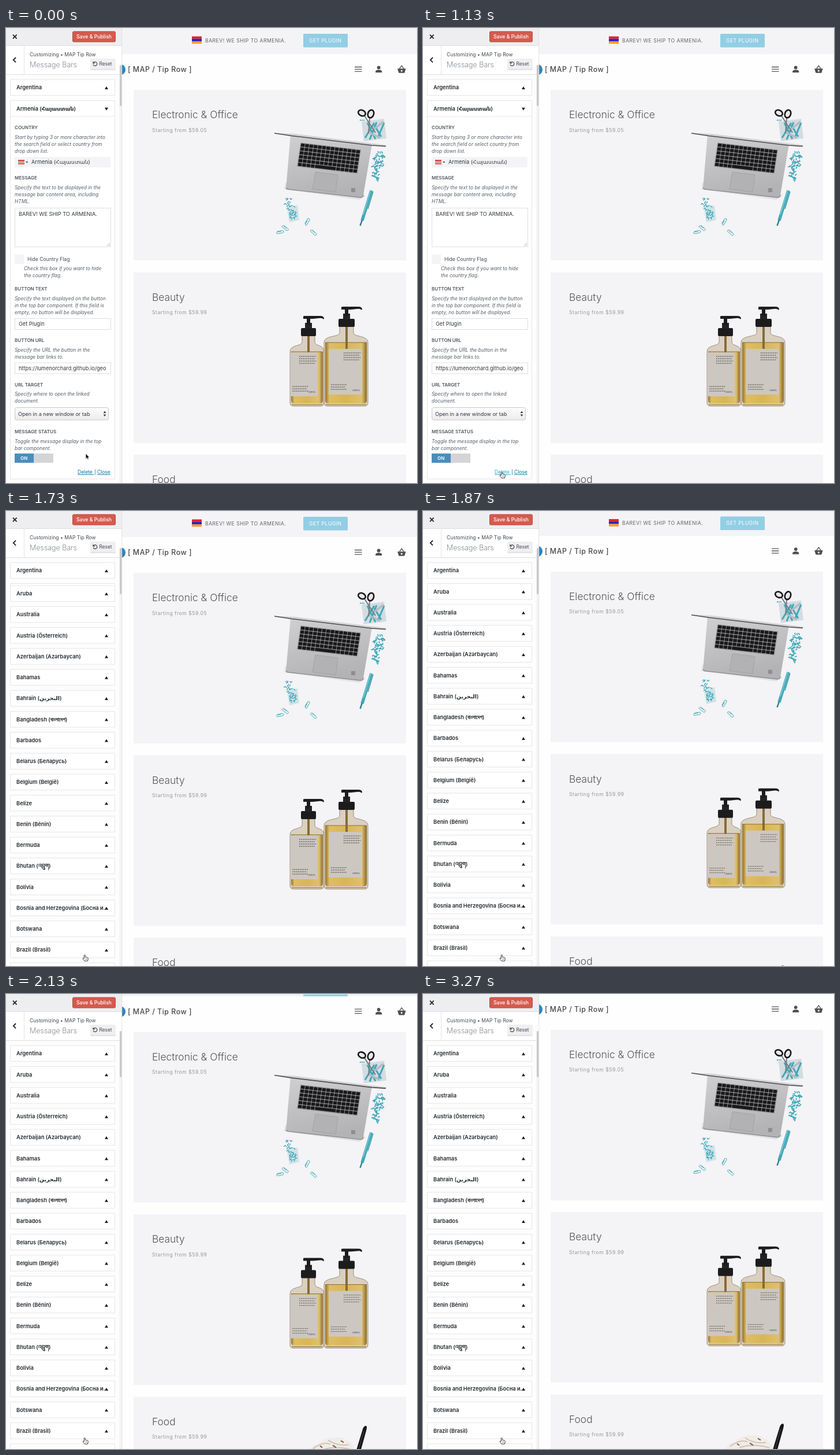
Animation of 712 by 787 pixels, one loop 3.34 s. Source, as an HTML page:

```html
<!DOCTYPE html>
<html lang="en">
<head>
<meta charset="utf-8">
<title>Message Bars</title>
<style>
html, body { margin: 0; width: 100%; height: 100%; overflow: hidden; background: #fff; }
svg { display: block; width: 712px; height: 787px; }
text { font-family: Inter, "Noto Sans", "DejaVu Sans", sans-serif; white-space: pre; }
.row { font-size: 9.3px; font-weight: 600; fill: #23282d; }
.cap { font-size: 8px; font-weight: 600; fill: #50575e; }
.hint { font-size: 8.4px; font-style: italic; fill: #555d66; }
.field { font-size: 9.2px; fill: #32373c; }
.label { font-size: 8.6px; fill: #444a50; }
.link { font-size: 8.5px; fill: #0073aa; text-decoration: underline; }
.title { font-size: 17.4px; font-weight: 300; fill: #55565a; }
.price { font-size: 8.6px; letter-spacing: .55px; fill: #98989d; }
.bar { font-size: 8.7px; letter-spacing: .45px; fill: #66666b; }
.brand { font-size: 12.4px; font-weight: 500; letter-spacing: .5px; fill: #47484c; }
.tiny { font: 4.4px "Liberation Serif", serif; fill: #444; }
</style>
</head>
<body>
<svg id="stage" viewBox="0 0 712 787" xmlns="http://www.w3.org/2000/svg"></svg>
<script>
const LOOP = 3340, STEP = 200 / 3;
const OPEN_H = 655, SHIFT = 663.3, BAR_H = 45.3, PITCH = 36.25;

let seed = 7;
const rnd = () => (seed = (seed * 16807) % 2147483647) / 2147483647;

const text = (x, y, s, cls, extra = '') =>
  `<text x="${x}" y="${y}" class="${cls}" ${extra}>${s.replace(/&/g, '&amp;')}</text>`;
const rect = (x, y, w, h, fill, extra = '') =>
  `<rect x="${x}" y="${y}" width="${w}" height="${h}" fill="${fill}" ${extra}/>`;
const path = (d, fill, extra = '') => `<path d="${d}" fill="${fill}" ${extra}/>`;
const line = (d, color, w = 1, extra = '') =>
  path(d, 'none', `stroke="${color}" stroke-width="${w}" ${extra}`);
const group = (id, body, extra = '') => `<g id="${id}" ${extra}>${body}</g>`;
const flag = (x, y, w, h, colors) =>
  colors.map((c, i) => rect(x, y + i * h / 3, w, h / 3 + .1, c)).join('');

/* ---------- sidebar ---------- */
const countries = ['Aruba', 'Australia', 'Austria (Österreich)', 'Azerbaijan (Azərbaycan)',
  'Bahamas', 'Bahrain (البحرين)', 'Bangladesh (বাংলাদেশ)', 'Barbados', 'Belarus (Беларусь)',
  'Belgium (België)', 'Belize', 'Benin (Bénin)', 'Bermuda', 'Bhutan (འབྲུག)', 'Bolivia',
  'Bosnia and Herzegovina (Босна и…', 'Botswana', 'Brazil (Brasil)', 'British Virgin Islands'];
const EDGE = 'stroke="#e6e6e9"';

const row = (name, top, open) => {
  const c = top + 13.8;
  const tri = open ? `M171 ${c - 1.6}h6l-3 5z` : `M171 ${c + 3}h6l-3 -5z`;
  return rect(7.5, top, 181, 27.4, '#fff', EDGE) + text(18, c + 3.3, name, 'row') + path(tri, '#191e23');
};
const hints = (x, y, lines) => lines.map((s, i) => text(x, y + i * 12, s, 'hint')).join('');
const input = (y, h) => rect(15.5, y + .5, 166, h, '#fff', 'stroke="#dfdfe2"');

function armenia() {
  const name = 'Armenia (Հայաստան)';
  return rect(7.5, 125.5, 181, 654.5, '#fff', EDGE) + row(name, 125.5, true) +
    text(15, 175, 'COUNTRY', 'cap') +
    hints(15, 192, ['Start by typing 3 or more character into', 'the search field or select country from', 'drop down list.']) +
    rect(15, 223, 166, 18, '#f4f4f6') + flag(21, 228, 11, 8, ['#d6453f', '#b6b0cc', '#dc7458']) +
    path('M34 231h4.4l-2.2 2.6z', '#444') + text(44, 235, name, 'field') +
    text(15, 262, 'MESSAGE', 'cap') +
    hints(15, 279, ['Specify the text to be displayed in the', 'message bar content area, including', 'HTML.']) +
    input(311, 67) + text(22, 325, 'BAREV! WE SHIP TO ARMENIA.', 'field') +
    line('M175 377l5 -5M178 377l2 -2', '#999', .8) +
    rect(15, 392, 16, 16, '#f4f4f6') + text(37, 403, 'Hide Country Flag', 'label') +
    hints(31, 418.5, ['Check this box if you want to hide', 'the country flag.']) +
    text(15, 454, 'BUTTON TEXT', 'cap') +
    hints(15, 471, ['Specify the text displayed on the button', 'in the top bar component. If this field is', 'empty, no button will be displayed.']) +
    input(502, 19) + text(22, 515, 'Get Plugin', 'field') +
    text(15, 543, 'BUTTON URL', 'cap') +
    hints(15, 560, ['Specify the URL the button in the', 'message bar links to.']) +
    input(578.5, 19) + text(22, 591.5, 'https://lumenorchard.github.io/geo', 'field') +
    text(15, 619.5, 'URL TARGET', 'cap') +
    hints(15, 636, ['Specify where to open the linked', 'document.']) +
    rect(15.5, 656.5, 162, 21.5, 'url(#sel)', 'rx="3" stroke="#c9c9cc"') +
    text(21, 670.5, 'Open in a new window or tab', 'field', 'style="font-size:9.05px"') +
    path('M168.6 666h4.8l-2.4 -3.4zM168.6 668.4h4.8l-2.4 3.4z', '#333') +
    text(15, 700.5, 'MESSAGE STATUS', 'cap') +
    hints(15, 717.5, ['Toggle the message display in the top', 'bar component.']) +
    rect(15, 736, 33, 16, '#4a8dbd') + rect(48, 736, 34, 16, '#d4d4d6') +
    text(25, 747.2, 'ON', 'cap', 'style="fill:#fff"') +
    text(124, 771, 'Delete ', 'link', 'id="del"') + text(153, 771, '|', 'link') + text(158, 771, 'Close', 'link');
}

function sidebar() {
  const rows = countries.map((n, i) => row(n, 125.5 + i * PITCH)).join('');
  return rect(0, 0, 201, 787, '#fdfdfd') + row('Argentina', 89.2) +
    group('panel', armenia(), 'clip-path="url(#open)"') + group('rows', rows) +
    rect(0, 0, 201, 30, '#eeeef0') + rect(0, 30, 201, 50, '#fff') +
    line('M0 30.5H201M0 80.5H201', '#dedee1') + line('M31.5 30V80', '#e4e4e7') +
    line('M12 11.7l6.6 6.6M18.6 11.7l-6.6 6.6', '#23282d', 1.9) +
    rect(115.5, 6, 74, 18, '#d55b4e', 'rx="2" stroke="#b9483d"') +
    text(122, 18.4, 'Save & Publish', '', 'font-size="8.7" font-weight="500" fill="#fff"') +
    line('M17 51l-4.2 4.2l4.2 4.2', '#191e23', 1.8) +
    text(41, 49, 'Customizing • MAP Tip Row', 'label') +
    text(41, 67.6, 'Message Bars', '', 'font-size="12.6" font-weight="200" fill="#555d66"') +
    rect(146, 53, 44, 19, '#efeff1', 'rx="2"') + rect(146, 71.5, 44, 1, '#cfcfd3') +
    line('M152 59.6a3.4 3.4 0 1 1 -.8 3.6', '#444', 1.2) + path('M150.4 57.4v4h4z', '#444') +
    text(161.5, 65.3, 'Reset', 'label', 'style="font-size:8.3px"') +
    rect(196.5, 64, 4.5, 723, '#f3f3f4') + rect(197, 64, 3.6, 71, '#c9c9cb', 'id="thumb" rx="1.8"') +
    line('M200.7 0V787', '#dcdce0', .8);
}

/* ---------- preview ---------- */
const TEAL = '#3fa9b9';
const clip = (x, y, a) =>
  line('M-5 -2H4a2 2 0 0 1 0 4H-5a1.5 1.5 0 0 1 0 -3H2', TEAL, .9, `transform="translate(${x} ${y}) rotate(${a})"`);
const scatter = (n, x, y, w, h) => {
  let out = '';
  for (let i = 0; i < n; i++) {
    const a = rnd() * 6.28, px = x + rnd() * w, py = y + rnd() * h;
    out += `M${px.toFixed(1)} ${py.toFixed(1)}l${(Math.cos(a) * 4).toFixed(1)} ${(Math.sin(a) * 4).toFixed(1)}`;
  }
  return out;
};

function keys() {
  let out = rect(-.1, -.1, 14.2, 6.2, '#8f8f92');
  for (let r = 0; r < 6; r++)
    for (let c = 0; c < 14; c++) {
      const space = r === 5 && c === 4;
      if (r === 5 && c > 4 && c < 9) continue;
      out += rect(c + .06, r + .09, space ? 4.88 : .88, .82, '#19191b', 'rx=".12"');
    }
  return `<g transform="matrix(7.36 .86 -1 6.67 511 199)">${out}</g>`;
}

function office() {
  return path('M482 279L612 297L622 291L620 286L484 268z', '#d9d9dd', 'opacity=".7"') +
    path('M493 184L634 201L619 289Q618 293.5 613 293L489 279Q485 278 485.3 274z', 'url(#deck)') +
    line('M485.3 276Q486 279 489 279L613 293Q618 293.5 619 289', '#8d8d91', 1.4) +
    path('M465 181.5L500 183L659 202.6L657 206L634 203.5L493 187z', '#d2d2d5') +
    line('M465 182L495 186.5L634 203L658 204.5', '#4c4c50', 1.6) + keys() +
    path('M536 249L575 254L571 283.5L531 278.5z', '#b2b2b5', 'stroke="#9b9b9e" stroke-width=".7"') +
    rect(598, 277, 7, 7, '#8e8e92') +
    path('M616 162L655 157L659 191L620 196z', '#cbd7dc', 'opacity=".8"') +
    line('M622 190l16 -26M630 193l12 -30M640 192l-14 -28M650 188l-12 -20M644 190l11 -26', TEAL, 3) +
    line('M636 176l18 -14M628 180l20 10', '#b4bcc2', 3.5) +
    line('M613 159.5h8', TEAL, 2, 'stroke-dasharray="2 1"') +
    line('M621 152L640 181M630 156L628 182', '#777b80', 2) +
    `<g fill="#e9e9ec" stroke="#17181a" stroke-width="2.6"><ellipse cx="616.5" cy="147" rx="6.6" ry="4.8" transform="rotate(25 616.5 147)"/><ellipse cx="632" cy="148.5" rx="5" ry="7" transform="rotate(20 632 148.5)"/></g>` +
    line(scatter(48, 636, 216, 18, 26) + scatter(22, 635, 240, 10, 22), TEAL, 1.7) +
    line('M633 281L617 333', TEAL, 5.4) + line('M632 281L619 323', '#8fd2da', 1.2) +
    line('M617 332L613.5 342', '#2c7f8d', 2.4) + line('M636 283L627 313', '#2c8c9b', 1.2) +
    path('M486 309L505 307L508 332L491 336z', '#c5dfe5', 'opacity=".8"') +
    line(scatter(30, 488, 306, 14, 22) + scatter(12, 484, 294, 12, 13), TEAL, 1.3) +
    clip(475, 353, -10) + clip(484, 346, 38) + clip(522, 335, -60) + clip(533, 354, 42);
}

function bottle(x, w, y, c, n, lx, lw, ly, lh) {
  const r = x + w, neck = y - 13, top = neck - 34;
  const body = `M${c - n} ${neck}V${y - 2}C${c - n} ${y + 6} ${x} ${y + 2} ${x} ${y + 15}V648q0 6 6 6H${r - 6}q6 0 6 -6V${y + 15}C${r} ${y + 2} ${c + n} ${y + 6} ${c + n} ${y - 2}V${neck}z`;
  const dots = (dx, dy, len, rows) => {
    let d = '';
    for (let i = 0; i < rows; i++) d += `M${dx} ${dy + i * 4}h${len - i % 2 * 2}`;
    return line(d, '#5c5752', 1.3, 'stroke-dasharray="1.6 1.5"');
  };
  return path(body, '#d9d0c2', 'stroke="#8b7a5a" stroke-width=".8"') +
    path(`M${x + 2} ${y + 15}H${r - 2}V644q0 5 -5 5H${x + 7}q-5 0 -5 -5z`, 'url(#oil)') +
    line(`M${x + 2} ${y + 15}H${r - 2}`, '#8d6f2c', 1) +
    line(`M${x + 3} 651.5H${r - 3}`, '#ab8b4c', 1.6) +
    line(`M${c} ${neck}V${ly}`, '#8a6a35', 4) +
    rect(lx, ly, lw, lh, '#cdc7c1') +
    dots(lx + lw - 32, ly + 7, 29, 4) + dots(lx + 4, ly + lh - 17, 27, 3) +
    text(lx + lw - 17, ly + lh - 6, 'ORDIL', 'tiny') +
    rect(c - n - 2, neck - 13, 2 * n + 4, 14, '#1d1c1d', 'rx="2"') +
    rect(c - 6, neck - 22, 12, 10, '#242324') + rect(c - 3, top + 4, 6, 12, '#1d1c1d') +
    path(`M${c - 9} ${top + 1}q0 -1 2 -1H${c + 20}q7 0 7 5l-1.5 .4q-1 -2 -6 -1.6L${c + 8} ${top + 5}H${c - 9}z`, '#1d1c1d');
}

function beauty() {
  return bottle(492, 59, 545, 524, 11, 492.5, 47.5, 561, 76) +
    bottle(551, 76, 529, 590, 12, 559, 58, 555, 79);
}

function dessert() {
  return path('M524 840Q524 822 541 820Q552 808 568 809Q582 806 590 814Q604 816 606 840z', '#f1ece7') +
    line('M532 828Q548 815 562 820M558 813Q574 824 594 821M548 830Q570 822 600 830', '#cfc4ba', 2) +
    line('M566 822l6 4M580 814l5 3M544 823l4 3', '#8b5c3c', 2) +
    path('M604 840L618 794Q620 788 624 788.5Q626 790 624 797L612 840z', '#161617') +
    line('M620 797L610 832', '#4c4c4f', 1);
}

function card(y, name, price, art) {
  return rect(221, y, 472, 295, '#f4f3f6') + text(253, y + 49.2, name, 'title') +
    text(253, y + 72.6, 'Starting from ' + price, 'price') + art;
}

function page() {
  return `<circle cx="197.5" cy="72" r="10.8" fill="#fff"/><circle cx="197.5" cy="72" r="9.6" fill="#2f84bd"/>` +
    text(211, 76.4, '[ MAP / Tip Row ]', 'brand') +
    line('M604 67.5h12.5M604 71.3h12.5M604 75.1h12.5', '#55565a', 1.3) +
    `<circle cx="645.7" cy="68.4" r="2.9" fill="#4e4f53"/>` +
    path('M640.2 77v-1.6q0 -3 5.5 -3.2q5.5 .2 5.5 3.2V77z', '#4e4f53') +
    path('M678.2 70.2h14.4l-2 6.8q-.3 .8 -1.2 .8h-8q-.9 0 -1.2 -.8z', '#4e4f53') +
    line('M681.6 70.5l3.8 -5.3l3.8 5.3', '#4e4f53', 1.3) +
    `<circle cx="685.4" cy="74" r="1.5" fill="#fff"/>` +
    card(107, 'Electronic & Office', '$59.05', office()) +
    card(422.6, 'Beauty', '$59.99', beauty()) +
    card(738, 'Food', '$59.99', dessert());
}

const notice = () => flag(322, 14.5, 17, 12.6, ['#e0262b', '#2a22c9', '#f2a02c']) +
  text(345, 24.7, 'BAREV! WE SHIP TO ARMENIA.', 'bar') +
  rect(515, 10, 77, 23.4, '#92cee4', 'rx="1.5"') +
  text(525, 24.8, 'GET PLUGIN', 'bar', 'style="fill:#fff"');

const arrow = path('M0 0V9.4L2.2 7.5L3.7 10.8L5.3 10.1L3.9 6.9H6.8z', '#111', 'stroke="#fff" stroke-width=".8"');
const hand = path('M-1.2 .8Q-.2 -.6 .8 .8V4L4.8 4.8Q6 5.2 5.8 6.8L5 10.8H-.4L-3.4 7Q-3.6 5.6 -2.2 5.8L-1.2 6.6z', '#fff', 'stroke="#222" stroke-width=".9"') +
  line('M1.4 6.4v2.4M3.2 6.6v2.2', '#333', .6);

const stage = document.getElementById('stage');
stage.innerHTML = `<defs>
<linearGradient id="sel" x2="0" y2="1"><stop stop-color="#fdfdfd"/><stop offset="1" stop-color="#ececee"/></linearGradient>
<linearGradient id="deck" x2=".3" y2="1"><stop stop-color="#d0d0d2"/><stop offset="1" stop-color="#b3b3b6"/></linearGradient>
<linearGradient id="oil"><stop stop-color="#94722f"/><stop offset=".1" stop-color="#dfbd62"/><stop offset=".5" stop-color="#d9b556"/><stop offset=".88" stop-color="#dfc06d"/><stop offset="1" stop-color="#8c6a2a"/></linearGradient>
<clipPath id="open"><rect id="openBox" x="0" y="125" width="200" height="656"/></clipPath>
<clipPath id="barClip"><rect id="barBox" x="201" width="511" height="45"/></clipPath></defs>` +
  rect(201, 0, 511, 787, '#fefefe') + group('page', page()) +
  group('bar', rect(201, 0, 511, 46, '#f4f4f7') + group('notice', notice()), 'clip-path="url(#barClip)"') +
  sidebar() + group('arrow', arrow) + group('hand', hand);

/* ---------- motion ---------- */
const $ = id => document.getElementById(id);
const swing = (t, start, length) => {
  const p = Math.min(1, Math.max(0, (t - start) / length));
  return .5 - Math.cos(Math.PI * p) / 2;
};
const move = (id, x, y) => $(id).setAttribute('transform', `translate(${x} ${y})`);
const show = (id, on) => $(id).setAttribute('visibility', on ? 'visible' : 'hidden');

function draw(t) {
  const shut = swing(t, 1352, 400);
  const gone = swing(t, 1809, 400);
  const reach = swing(t, 30, 320);

  $('openBox').setAttribute('height', (OPEN_H + 1) * (1 - shut));
  show('panel', shut < 1);
  move('rows', 0, SHIFT * (1 - shut));
  $('thumb').setAttribute('height', 71 + 9 * shut);

  move('page', 0, -BAR_H * gone);
  move('notice', 0, -10 * gone);
  $('barBox').setAttribute('height', BAR_H * (1 - gone));

  const x = 138 - 1.5 * reach, y = 736 + 31.5 * reach, over = y > 762;
  move('arrow', x, y);
  move('hand', x, y);
  show('arrow', !over);
  show('hand', over);
  $('del').style.fill = over ? '#23a5d6' : '';
}

const begin = performance.now();
function tick() {
  const t = (performance.now() - begin) % LOOP;
  draw(Math.min(49, Math.floor((t + 5) / STEP)) * STEP);
  requestAnimationFrame(tick);
}
tick();
</script>
</body>
</html>
```
